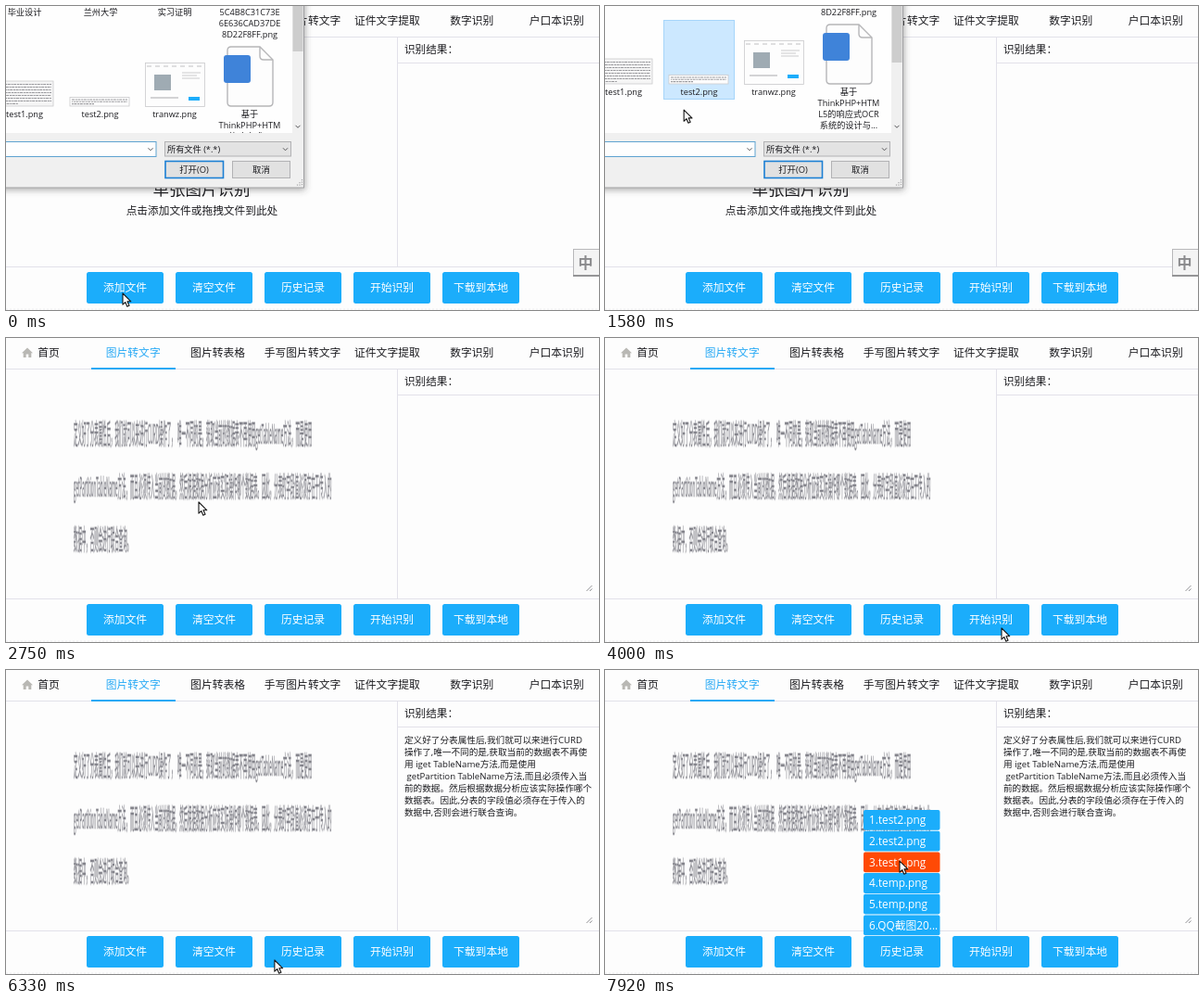
These frames come from a looping animation (640 px wide and 328 px high, 8000 ms). An HTML page:

```html
<!DOCTYPE html>
<html lang="zh-CN">
<head>
<meta charset="utf-8">
<title>单张图片识别</title>
<style>
  html, body { margin: 0; width: 100%; height: 100%; overflow: hidden; background: #fdfdfd; }
  svg { display: block; width: 100vw; height: 100vh; }
  text { font-family: "Open Sans", "Noto Sans CJK SC", "Noto Sans CJK", sans-serif; white-space: pre; }
</style>
</head>
<body>
<svg id="stage" viewBox="0 0 640 328" xmlns="http://www.w3.org/2000/svg"></svg>
<script>
const BLUE = '#1badfb', HOT = '#ff4a05', TAB = '#27a9f5', LINE = '#e2e1ea', INK = '#1c1c20';

// markup helpers; label() takes the vertical centre of the text
const label = (s, x, y, size = 11.8, fill = INK, anchor = 'middle', extra = '') =>
  `<text x="${x}" y="${y + size * 0.37}" font-size="${size}" fill="${fill}" text-anchor="${anchor}" ${extra}>${s}</text>`;
const box = (x, y, w, h, fill, extra = '') =>
  `<rect x="${x}" y="${y}" width="${w}" height="${h}" fill="${fill}" ${extra}/>`;
const path = (d, stroke, width = 1, extra = '') =>
  `<path d="${d}" fill="none" stroke="${stroke}" stroke-width="${width}" ${extra}/>`;
const group = (id, body, extra = '') => `<g id="${id}" ${extra}>${body}</g>`;
const chevron = (x, y) => path(`M${x - 2.5} ${y - 1.2}l2.5 2.5 2.5-2.5`, '#555558');

const TABS = ['图片转文字', '图片转表格', '手写图片转文字', '证件文字提取', '数字识别', '户口本识别'];
const BUTTONS = ['添加文件', '清空文件', '历史记录', '开始识别', '下载到本地'];
const HISTORY = ['1.test2.png', '2.test2.png', '3.test1.png', '4.temp.png', '5.temp.png', '6.QQ截图20...'];
const RESULT = [
  '定义好了分表属性后,我们就可以来进行CURD',
  '操作了,唯一不同的是,获取当前的数据表不再使',
  '用 iget TableName方法,而是使用',
  ' getPartition TableName方法,而且必须传入当',
  '前的数据。然后根据数据分析应该实际操作哪个',
  '数据表。因此,分表的字段值必须存在于传入的',
  '数据中,否则会进行联合查询。'
];
const SCAN = [
  '定义好了分表属性后，我们就可以来进行CURD操作了，  唯一不同的是，获取当前的数据表不再使用getTableName方法，而是使用',
  'getPartitionTableName方法，而且必须传入当前的数据，然后根据数据分析应该实际操作哪个数据表。因此，分表的字段值必须存在于传入的',
  '数据中，否则会进行联合查询。'
];
const ROW = 22.7, MENU_H = 136, MENU_BASE = 287;

function page() {
  const home = '<path d="M17 16.3L23 10.5l6 5.8h-1.7V21h-3v-3.6h-2.6V21h-3v-4.7z" fill="#b9b8b4"/>';
  const tabs = TABS.map((s, i) => label(s, 137.2 + i * 91.4, 16, 11.8, i ? INK : TAB)).join('');
  const lines = path('M0 33.5H640M422.5 34V281M423 61.5H640M0 281.5H640', LINE) +
    path('M0 327H640', '#eeeef0', 1, 'stroke-dasharray="2 2"');
  const buttons = BUTTONS.map((s, i) =>
    box(87 + i * 96, 287, 83, 34, BLUE, 'rx="2.5"') + label(s, 128.5 + i * 96, 304, 11.8, '#fff')).join('');
  const grip = path('M626.5 273l6-6M630 273l2.5-2.5', '#85858a', 0.9);
  return home + label('首页', 46, 16) + tabs + lines + box(92, 32, 91, 2, TAB) +
    label('识别结果：', 430, 47, 11.6, INK, 'start') + grip + buttons;
}

function dropArea() {
  const corners = 'M163 85v-6q0-4 4-4h6M244 75h6q4 0 4 4v6M254 157v6q0 4-4 4h-6M173 167h-6q-4 0-4-4v-6';
  return path(corners, TAB, 4) +
    box(177, 88, 70, 61, 'none', `rx="4" stroke="${TAB}" stroke-width="5"`) +
    `<circle cx="231" cy="104" r="7" fill="${TAB}"/>` +
    `<path d="M179 143L202 112l17 21 9-9 17 19v6H179z" fill="${TAB}"/>` +
    label('单张图片识别', 211, 198, 17.5) +
    label('点击添加文件或拖拽文件到此处', 211.5, 220.5, 11.7);
}

// the picked picture is shown squeezed to the preview area
const scan = () => SCAN.map((s, i) =>
  `<text transform="translate(73 ${114 + i * 57}) scale(.148 1)" font-size="30" fill="#85858c" stroke="#85858c" stroke-opacity=".35" stroke-width="2">${s}</text>`).join('');

const result = () => RESULT.map((s, i) => label(s, 430, 75 + i * 13, 9.65, INK, 'start')).join('');

const menu = () => HISTORY.map((s, i) =>
  box(279, i * ROW, 82.5, ROW - 0.9, BLUE, 'class="item" rx="2"') +
  label(s, 285, i * ROW + 11, 11.8, '#fff', 'start')).join('');

function files() {
  const name = (s, x, y) => label(s, x, y, 9.2);
  const rows = (x, y, w, n, step) => Array.from({ length: n }, (_, i) =>
    path(`M${x} ${y + i * step}h${w - (i === n - 1 ? w * 0.6 : 0)}`, '#9a9a9e', 1.1,
      `stroke-dasharray="3 .8 2 .6" stroke-dashoffset="${i * 2}"`)).join('');
  const edge = 'stroke="#cacacc" stroke-width=".8"';
  return box(-18, 39, 77, 86, 'none', 'id="hover1"') +
    box(63.5, 39.5, 76, 85, 'none', 'id="hover2"') +
    name('毕业设计', 20, 7) + name('兰州大学', 102, 7) + name('实习证明', 182, 7) +
    ['5C4B8C31C73E', '6E636CAD37DE', '8D22F8FF.png'].map((s, i) => name(s, 263, 7 + i * 11.7)).join('') +
    box(-13, 81, 64, 27, '#f5f5f5', edge) + rows(-11, 84.5, 60, 8, 3) +
    box(69, 98.5, 64, 9.5, '#fdfdfd', edge) + rows(71, 101, 60, 3, 2.3) +
    box(150.5, 61.5, 64, 47, '#fdfdfd', edge) +
    path('M152 65h60', '#c0c0c2', 1, 'stroke-dasharray="5 4"') +
    box(160, 74, 18, 17, '#9fabb3') +
    path('M190 72h20M190 75h16M190 78h19', '#c6c6c8', 0.9) +
    path('M156 99h30', '#b8b8ba', 1.2) + box(197, 98, 12, 4, BLUE) +
    '<path d="M243 44h31l14 14v46q0 4-4 4h-41q-4 0-4-4V48q0-4 4-4z" fill="#fdfdfd" stroke="#b6b6b8" stroke-width="1.4"/>' +
    path('M274 44v10q0 4 4 4h10', '#b6b6b8', 1.4) +
    box(235, 53, 29, 30, '#3f83d9', 'rx="3"') +
    name('test1.png', 20, 117) + name('test2.png', 101.5, 117) + name('tranwz.png', 182, 117) +
    ['基于', 'ThinkPHP+HTM', 'L5的响应式OCR', '系统的设计与...'].map((s, i) => name(s, 263, 117 + i * 11.7)).join('');
}

function dialog() {
  const border = 'stroke="#b2b2b4"';
  return box(-300, -140, 621.5, 336, '#f0f0f0', 'stroke="#a0a0a2" filter="url(#shadow)"') +
    box(-300, -140, 609, 277, '#fefefe') +
    `<g clip-path="url(#listClip)">${group('files', files())}</g>` +
    box(309, -140, 12, 277, '#f0f0f0') +
    box(309.5, -60, 11, 109, '#cdcdcd', 'id="thumb"') + chevron(315, 130) +
    box(-200, 146.5, 362, 16, '#fefefe', 'stroke="#5fa3d0"') + chevron(156, 154.5) +
    box(171.5, 146.5, 136, 15.5, '#e3e3e3', border) +
    label('所有文件 (*.*)', 174, 154.5, 9.2, INK, 'start') + chevron(301.5, 154.5) +
    box(172, 167.5, 62.5, 18, '#e1e1e1', 'id="open" stroke="#1b7fd4" stroke-width="1.6"') +
    label('打开(O)', 203, 176.5, 9.4) +
    box(244.5, 167.5, 62, 18, '#e1e1e1', border) + label('取消', 275.5, 176.5, 9.4) +
    path('M319.5 187v7M317 190v4M314.5 192.5v1.5', '#a8a8aa', 1.2, 'stroke-dasharray="1.2 1.3"');
}

const ime = () => box(612.5, 262.5, 30, 28.5, '#f4f4f4', 'stroke="#b8b8ba"') +
  path('M612 291H640', '#949496', 2) + label('中', 625.5, 277, 16, '#8a8a8c', 'middle', 'font-weight="700"');

const arrow = '<path d="M0 0V12.2L2.8 9.6 4.8 14.2 7 13.2 5 8.8H8.8Z" fill="#fff" stroke="#151515" stroke-width="1.1" stroke-linejoin="round"/>';

document.getElementById('stage').innerHTML =
  `<defs>
    <clipPath id="listClip"><rect x="-300" y="-140" width="609" height="277"/></clipPath>
    <clipPath id="menuClip"><rect width="640" height="${MENU_BASE}"/></clipPath>
    <filter id="shadow" x="-10%" y="-10%" width="120%" height="120%">
      <feDropShadow dx="1" dy="2" stdDeviation="3.5" flood-color="#444" flood-opacity=".45"/>
    </filter>
  </defs>` +
  page() + group('drop', dropArea()) + group('scan', scan()) + group('result', result()) +
  `<g clip-path="url(#menuClip)">${group('menu', menu())}</g>` +
  group('dialog', dialog()) + group('ime', ime()) + group('cursor', arrow);

const $ = id => document.getElementById(id);
const ui = Object.fromEntries(['drop', 'scan', 'result', 'menu', 'dialog', 'ime', 'cursor',
  'files', 'hover1', 'hover2', 'thumb', 'open'].map(id => [id, $(id)]));
const items = document.querySelectorAll('.item');

const LOOP = 8000, TICK = 1000 / 12;
const PICK = 1080, FADE = 2333, FADE_MS = 185, PREVIEW = 2580, DONE = 4915, MENU = 6730, MENU_MS = 600;

// pointer path: time, x, y
const MOVES = [
  [0, 126, 310], [167, 126, 310], [417, 106, 255], [667, 46, 125], [750, 44, 108],
  [917, 78, 108], [1000, 85, 112], [1583, 85, 112], [1833, 200, 174], [1917, 208, 177],
  [2833, 208, 177], [2917, 280, 226], [3000, 373, 293], [3250, 373, 293], [3333, 430, 311],
  [3750, 428, 313], [5667, 428, 313], [6000, 372, 311], [6333, 290, 313], [6500, 228, 308],
  [6583, 230, 308], [6750, 281, 310], [7083, 312, 309], [7250, 315, 308], [7333, 315, 308],
  [7917, 318, 206], [LOOP, 318, 206]
];

function pointer(t) {
  const i = Math.max(1, MOVES.findIndex(m => m[0] >= t));
  const [t0, x0, y0] = MOVES[i - 1], [t1, x1, y1] = MOVES[i];
  const p = (t - t0) / (t1 - t0);
  return [x0 + (x1 - x0) * p, y0 + (y1 - y0) * p];
}

const clamp = p => Math.min(1, Math.max(0, p));
const show = (el, on) => el.setAttribute('visibility', on ? 'visible' : 'hidden');

function draw(t) {
  const [x, y] = pointer(t);
  ui.cursor.setAttribute('transform', `translate(${x} ${y})`);

  const picked = t >= PICK, fade = clamp((t - FADE) / FADE_MS), k = 1 - 0.044 * fade;
  const over = (a, b) => !picked && x >= a && x < b && y >= 39 && y < 125;
  ui.hover1.setAttribute('fill', over(0, 59) ? '#e5f3ff' : 'none');
  ui.hover2.setAttribute('fill', fade ? '#d6d6d6' : picked ? '#cce8ff' : over(63, 140) ? '#e5f3ff' : 'none');
  ui.hover2.setAttribute('stroke', picked && !fade ? '#a6d5fa' : 'none');
  ui.files.setAttribute('transform', `translate(0 ${picked ? -24 : 0})`);
  ui.thumb.setAttribute('height', picked ? 121 : 109);
  ui.open.setAttribute('fill', t >= 1830 ? '#d3eafa' : '#e1e1e1');
  ui.dialog.setAttribute('opacity', 1 - fade);
  ui.dialog.setAttribute('transform', `translate(30 -40) scale(${k}) translate(-30 40)`);
  show(ui.dialog, fade < 1);
  show(ui.ime, t < FADE);

  show(ui.drop, t < PREVIEW);
  show(ui.scan, t >= PREVIEW);
  show(ui.result, t >= DONE);

  const height = MENU_H * (0.5 - Math.cos(Math.PI * clamp((t - MENU) / MENU_MS)) / 2);
  const top = MENU_BASE - height;
  ui.menu.setAttribute('transform', `translate(0 ${top})`);
  show(ui.menu, t >= MENU);
  const hot = y < MENU_BASE ? Math.floor((y - top) / ROW) : -1;
  items.forEach((el, i) => el.setAttribute('fill', t > MENU && i === hot ? HOT : BLUE));
}

// the screen advances at 12 pictures a second
function frame() {
  const t = performance.now() % LOOP;
  draw(Math.floor((t + 4) / TICK) * TICK);
  requestAnimationFrame(frame);
}
frame();
</script>
</body>
</html>
```
